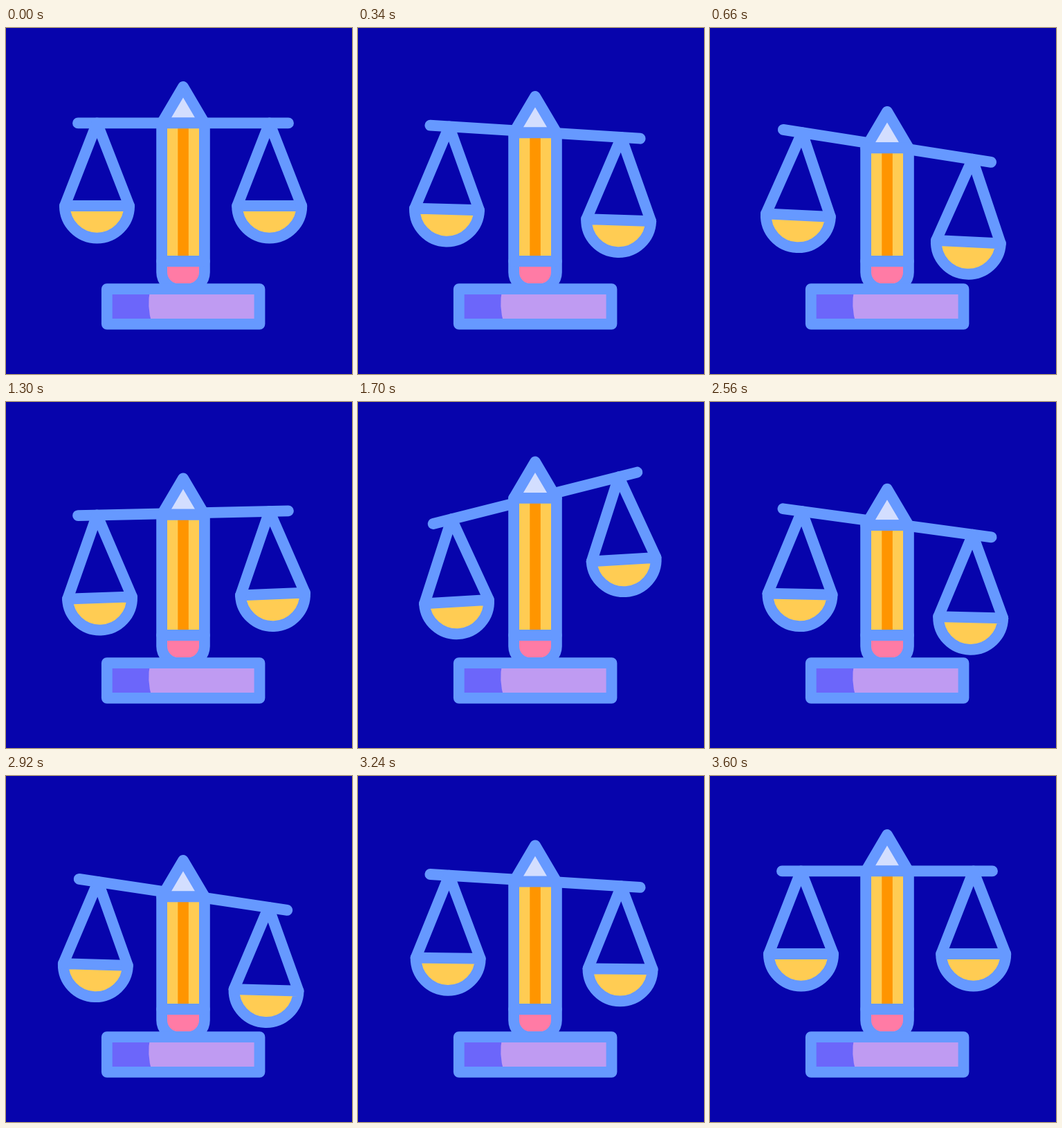
These frames come from a looping animation (500x500 px, 3620 ms). An HTML page with a canvas:

```html
<!DOCTYPE html>
<html lang="en">
<head>
<meta charset="utf-8">
<title>Pencil scales</title>
<style>
  html, body { margin: 0; width: 100%; height: 100%; overflow: hidden; background: #0704ac; }
  canvas { display: block; }
</style>
</head>
<body>
<canvas id="stage" width="500" height="500"></canvas>
<script>
const ctx = document.getElementById('stage').getContext('2d');
const LOOP = 3620;
const STEP = 20;
const LINE = 15.8;
const CX = 256;
const BEAM_Y = 137.4;
const C = {
  back: '#0704ac', line: '#6699ff', yellow: '#ffcc53', orange: '#ff9500',
  pink: '#ff7ba5', tip: '#d3deff', violet: '#6c66fa', lilac: '#bf9bf2'
};

// Keys are [time, value] pairs, eased in and out between neighbours.
const LIFT = [[0, 0], [900, 1], [1800, 0], [2700, 1], [3600, 0]];
const BEAM_TILT = [[0, 0], [850, 10.2], [1810, -15.1], [2720, 9.8], [3600, 0]];
const LEFT_SWING = [[0, 0], [620, 2.7], [1640, -3.5], [2790, 1.8], [3600, 0]];
const RIGHT_SWING = [[0, 0], [580, 2.9], [1590, -3.6], [2750, 1.75], [3600, 0]];

function valueAt(keys, t) {
  for (let i = 1; i < keys.length; i++) {
    const [t0, a] = keys[i - 1];
    const [t1, b] = keys[i];
    if (t <= t1) {
      const u = (t - t0) / (t1 - t0);
      return a + (b - a) * u * u * (3 - 2 * u);
    }
  }
  return keys[keys.length - 1][1];
}

const radians = deg => deg * Math.PI / 180;

function polygon(points, close) {
  ctx.beginPath();
  points.forEach(([x, y]) => ctx.lineTo(x, y));
  if (close) ctx.closePath();
}

function line(...points) {
  polygon(points);
  ctx.stroke();
}

function box(color, x0, y0, x1, y1) {
  ctx.fillStyle = color;
  ctx.fillRect(x0, y0, x1 - x0, y1 - y0);
}

// The origin is the point where the pan hangs.
function drawPan(x, y, swing) {
  const half = 46.6, rim = 119.6;
  ctx.save();
  ctx.translate(x, y);
  ctx.rotate(radians(swing));
  ctx.beginPath();
  ctx.arc(0, rim, half, 0, Math.PI);
  ctx.closePath();
  ctx.fillStyle = C.yellow;
  ctx.fill();
  ctx.stroke();
  line([-half, rim], [0, 0], [half, rim]);
  ctx.restore();
}

function drawScales(t) {
  const tilt = radians(valueAt(BEAM_TILT, t));
  const y = BEAM_Y + 40 * valueAt(LIFT, t);
  const along = d => [CX + d * Math.cos(tilt), y + d * Math.sin(tilt)];
  line(along(-152), along(152));
  drawPan(...along(-124.5), valueAt(LEFT_SWING, t));
  drawPan(...along(124.7), valueAt(RIGHT_SWING, t));
}

function drawPencil(t) {
  const left = 225.1, right = 286.9, bottom = 377, r = 24;
  const top = BEAM_Y + 43.5 * valueAt(LIFT, t);

  polygon([[left, top], [CX, top - 52.4], [right, top]], true);
  ctx.fillStyle = C.tip;
  ctx.fill();
  ctx.stroke();

  box(C.yellow, left, top, right, 337);
  box(C.orange, 248.3, top, 263.8, 337);

  ctx.beginPath();
  ctx.moveTo(left, 337);
  ctx.arcTo(left, bottom, CX, bottom, r);
  ctx.arcTo(right, bottom, right, 337, r);
  ctx.lineTo(right, 337);
  ctx.closePath();
  ctx.fillStyle = C.pink;
  ctx.fill();
  ctx.stroke();
  line([left, 337], [left, top], [right, top], [right, 337]);
}

function drawBase() {
  const x0 = 145.8, y0 = 377.2, x1 = 366.5, y1 = 427.8;
  box(C.lilac, x0, y0, x1, y1);
  ctx.beginPath();
  ctx.moveTo(x0, y0);
  ctx.lineTo(208.5, y0);
  ctx.quadraticCurveTo(203, 402, 211, y1);
  ctx.lineTo(x0, y1);
  ctx.fillStyle = C.violet;
  ctx.fill();
  ctx.strokeRect(x0, y0, x1 - x0, y1 - y0);
}

function draw(t) {
  box(C.back, 0, 0, 500, 500);
  ctx.strokeStyle = C.line;
  ctx.lineWidth = LINE;
  ctx.lineCap = ctx.lineJoin = 'round';
  drawScales(t);
  drawPencil(t);
  drawBase();
}

const start = performance.now();
function tick() {
  const t = (performance.now() - start) % LOOP;
  draw(Math.floor(t / STEP) * STEP);
  requestAnimationFrame(tick);
}
tick();
</script>
</body>
</html>
```
